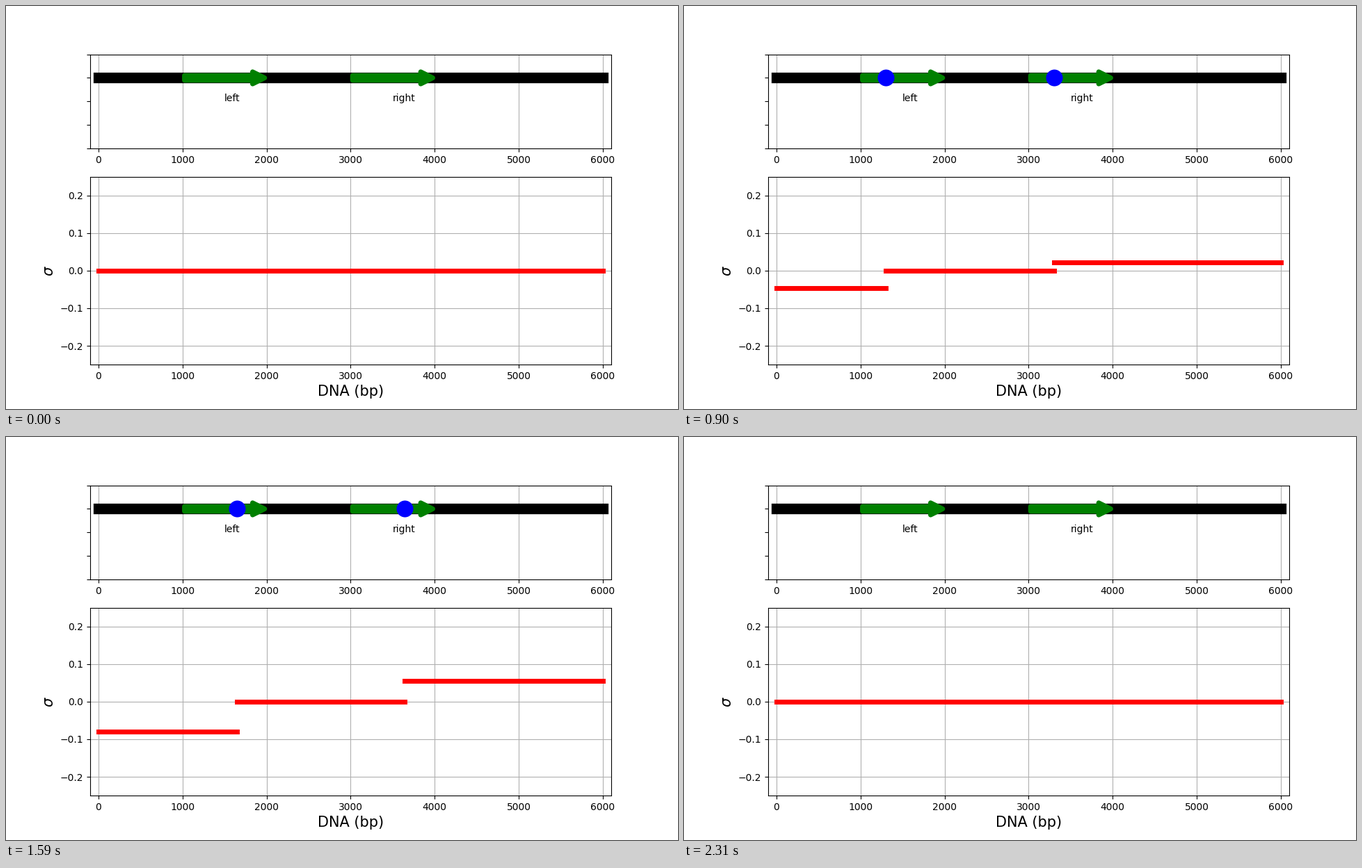
Animation, 966 px wide and 580 px high, one loop 3.1 s. Source, as a matplotlib script:

```python
import matplotlib.pyplot as plt
from matplotlib.animation import FuncAnimation
from matplotlib.patches import FancyArrowPatch

plt.rcParams["font.family"] = "DejaVu Sans"

WIDTH, HEIGHT, DPI = 966, 580, 100
TICK_MS, LOOP_MS = 10, 3100
START_MS, STEP_MS = 330, 30
DNA_LENGTH = 6000
GENES = {"left": 1000, "right": 3000}
GENE_LENGTH = 1000
STEP_BP = 15
LANE = 3

fig, (dna_ax, sigma_ax) = plt.subplots(
    2, 1, figsize=(WIDTH / DPI, HEIGHT / DPI), dpi=DPI,
    gridspec_kw={"height_ratios": [1, 2]})
# Keep the 5:3 layout although the pixel width is rounded down.
scale = HEIGHT * 5 / 3 / WIDTH
fig.subplots_adjust(left=0.125 * scale, right=0.9 * scale,
                    bottom=0.11, top=0.88, hspace=0.2)

for ax in (dna_ax, sigma_ax):
    ax.set_xlim(-100, DNA_LENGTH + 100)
    ax.set_xticks(range(0, DNA_LENGTH + 1, 1000))

dna_ax.set_ylim(0, 4)
dna_ax.set_yticks(range(5), labels=[])
dna_ax.grid(axis="x")
dna_ax.plot([0, DNA_LENGTH], [LANE, LANE], color="black", lw=11)

for name, start in GENES.items():
    dna_ax.add_patch(FancyArrowPatch(
        (start, LANE), (start + GENE_LENGTH, LANE), arrowstyle="simple",
        mutation_scale=25, lw=5, color="green", zorder=3))
    dna_ax.text(start + GENE_LENGTH / 2, 2, name)

sigma_ax.set_ylim(-0.25, 0.25)
sigma_ax.set_yticks([-0.2, -0.1, 0, 0.1, 0.2])
sigma_ax.set_xlabel("DNA (bp)", fontsize=15)
sigma_ax.set_ylabel(r"$\sigma$", fontsize=15)
sigma_ax.grid()

polymerases = dna_ax.scatter([], [], s=300, c="blue", linewidths=0, zorder=4)
domains = [sigma_ax.plot([], [], color="red", lw=5)[0] for _ in range(3)]


def supercoiling(moved):
    """Sigma behind, between and ahead of the two polymerases."""
    behind = -0.2097 * (moved + STEP_BP) / (moved + 1095)
    ahead = 0.203 * moved / (DNA_LENGTH - GENES["right"] - moved)
    return behind, 0, ahead


def update(frame):
    step = (frame * TICK_MS - START_MS) // STEP_MS + 1
    moved = step * STEP_BP
    bound = 0 < moved < GENE_LENGTH
    polymerases.set_visible(bound)
    if bound:
        sites = [start + moved for start in GENES.values()]
        polymerases.set_offsets([(x, LANE) for x in sites])
        edges = [0, *sites, DNA_LENGTH]
        levels = supercoiling(moved)
    else:
        edges = [0, DNA_LENGTH, DNA_LENGTH, DNA_LENGTH]
        levels = (0, 0, 0)
    for line, x0, x1, level in zip(domains, edges, edges[1:], levels):
        line.set_data([x0, x1], [level, level])
        line.set_visible(x1 > x0)
    return [polymerases, *domains]


anim = FuncAnimation(fig, update, frames=LOOP_MS // TICK_MS,
                     interval=TICK_MS, repeat=True, repeat_delay=0)
plt.show()
```
